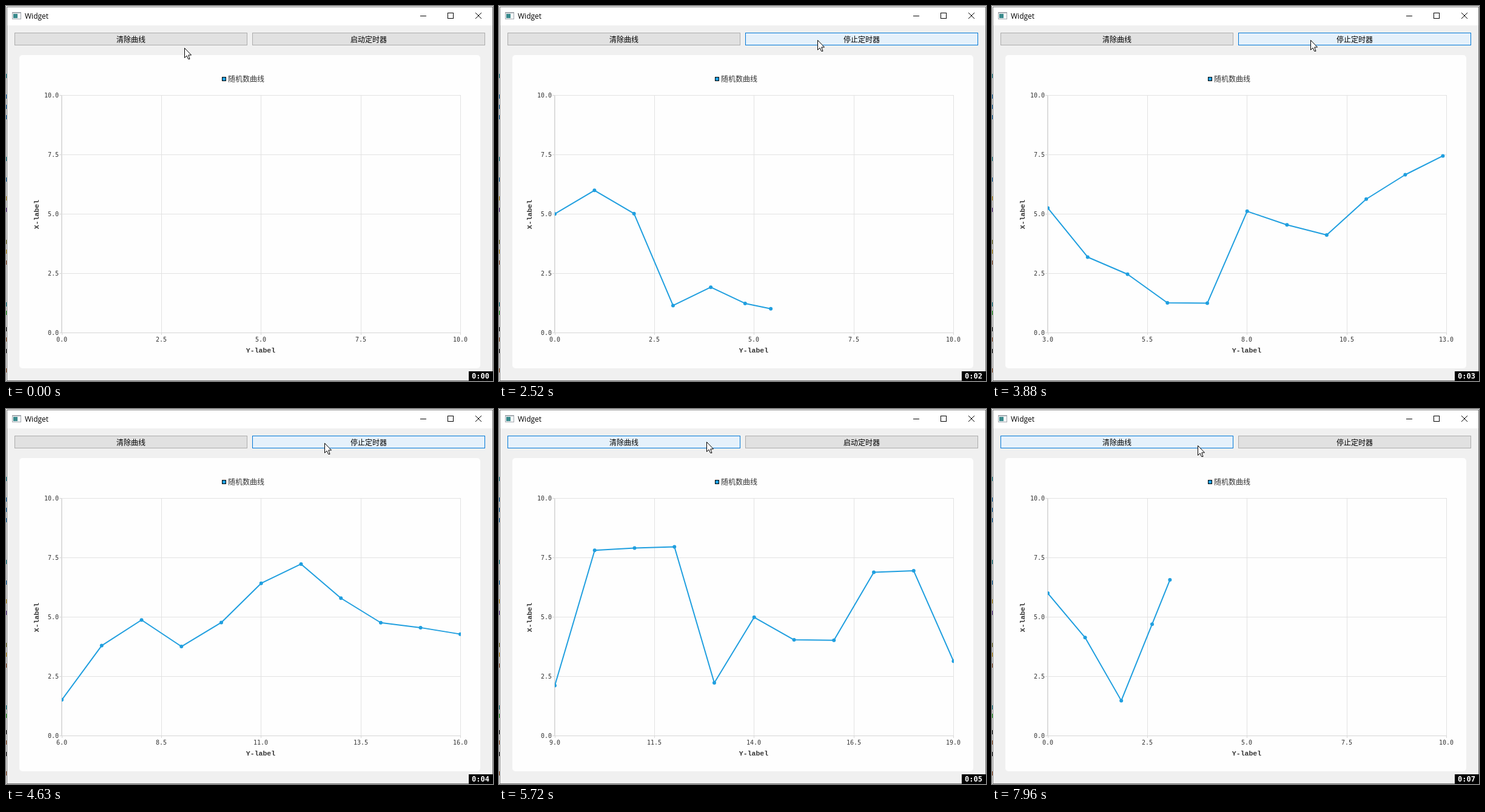
An HTML page with a canvas that plays this animation: 803x619 px, repeating every 8000 ms.

```html
<!DOCTYPE html>
<html lang="zh">
<head>
<meta charset="utf-8">
<title>Widget</title>
<style>
html, body { margin: 0; width: 100%; height: 100%; overflow: hidden; background: #fff; }
canvas { display: block; }
</style>
</head>
<body>
<canvas id="stage" width="803" height="619"></canvas>
<script>
const ctx = document.getElementById('stage').getContext('2d');
const LOOP = 8000;
const BLUE = '#209fdf';
const PLOT = { left: 92, top: 147.5, width: 657.5, height: 391.5 };
const CJK = '12px "Noto Sans CJK SC", "Noto Sans CJK", sans-serif';
const AXIS = '10px "DejaVu Sans Mono", monospace';
const AXIS_TITLE = 'bold 11.5px "Liberation Mono", monospace';

// Each run appends one value per timer tick until it is cleared.
const runs = [
  { start: 1135, end: 6000, period: 210,
    data: [5, 6, 5, 1, 2, 1, 1, 9, 4, 2, 8, 8, 8, 2, 5, 4, 4, 7, 7, 3] },
  { start: 7145, end: LOOP, period: 200, data: [6, 4, 1, 7, 0] }
];

// Pointer path: time, x, y
const path = [
  [60, 294, 69], [300, 320, 62], [500, 360, 58], [700, 390, 58], [850, 414, 58],
  [1450, 414, 58], [1600, 392, 58], [1800, 392, 57], [2150, 525, 56], [5300, 525, 56],
  [5620, 342, 54], [6300, 342, 54], [6700, 470, 43], [6800, 470, 48], [7100, 470, 48],
  [7500, 339, 60]
];

const buttons = [
  { x: 14, hover: [[192, 757], [1548, 1846], [5502, 6483], [7313, 9000]], press: [[5940, 6000]],
    label: () => '清除曲线' },
  { x: 406, hover: [[792, 1511], [1866, 5492], [6500, 7297]],
    press: [[980, 1060], [5140, 5200], [6880, 6945]],
    label: t => (t >= 1060 && t < 5200) || t >= 6945 ? '停止定时器' : '启动定时器' }
];

const clamp = v => Math.max(0, Math.min(1, v));
const lerp = (a, b, u) => a + (b - a) * u;
const mix = (a, b, u) => `rgb(${a.map((v, i) => Math.round(lerp(v, b[i], u)))})`;

function box(x, y, w, h, color) {
  ctx.fillStyle = color;
  ctx.fillRect(x, y, w, h);
}

function frame(x, y, w, h, color) {
  ctx.strokeStyle = color;
  ctx.lineWidth = 1;
  ctx.strokeRect(x + 0.5, y + 0.5, w - 1, h - 1);
}

function polyline(points, color, width = 1) {
  ctx.strokeStyle = color;
  ctx.lineWidth = width;
  ctx.beginPath();
  points.forEach(([x, y]) => ctx.lineTo(x, y));
  ctx.stroke();
}

function text(str, x, y, font, color = '#333', align = 'center') {
  ctx.font = font;
  ctx.fillStyle = color;
  ctx.textAlign = align;
  ctx.fillText(str, x, y);
}

function drawWindow() {
  box(0, 0, 803, 619, '#fff');
  const specks = { '#1a8f9c': [112, 249, 489], '#1673b8': [146, 163, 180, 283], '#d6a31c': [314, 402],
    '#6a3a9c': [333], '#8a8430': [386], '#a05a32': [420, 547, 598], '#24b324': [503], '#222': [530, 566] };
  for (const color in specks) specks[color].forEach(y => box(0, y, 2, 7, color));
  box(2, 2, 800, 30, '#fff');
  box(2, 32, 800, 586, '#f0f0f0');
  frame(1, 1, 802, 618, '#727272');

  box(10, 10, 15, 12, '#a5aab0');
  box(11, 12, 13, 9, '#f4f6f7');
  box(12, 13, 7, 7, '#3a8a8c');
  text('Widget', 31, 21, '12px "Open Sans", sans-serif', '#000', 'left');

  box(683, 16, 10, 1, '#000');
  frame(728, 11, 10, 10, '#000');
  polyline([[774, 11], [784, 21]], '#000');
  polyline([[784, 11], [774, 21]], '#000');
}

function hoverLevel(spans, t) {
  return Math.max(...spans.map(([from, to]) =>
    Math.min(clamp((t - from) / 200), clamp(1 - (t - to) / 200))));
}

function drawButton({ x, hover, press, label }, t) {
  const level = hoverLevel(hover, t);
  const pressed = press.some(([from, to]) => t >= from && t < to);
  box(x, 44, 384, 21, pressed ? '#cce4f7' : mix([225, 225, 225], [229, 241, 251], level));
  frame(x, 44, 384, 21, pressed ? '#005499' : mix([173, 173, 173], [0, 120, 215], level));
  text(label(t), x + 192, 59.5, CJK, '#000');
}

function drawAxes(first) {
  ctx.fillStyle = '#fefefe';
  ctx.beginPath();
  ctx.roundRect(22, 81, 760, 517, 5);
  ctx.fill();
  box(356, 117, 7, 7, BLUE);
  frame(356, 117, 7, 7, '#000');
  text('随机数曲线', 366, 124.5, CJK, '#333', 'left');

  const right = PLOT.left + PLOT.width, bottom = PLOT.top + PLOT.height;
  for (let i = 0; i <= 4; i++) {
    const x = Math.floor(PLOT.left + PLOT.width * i / 4);
    const y = Math.floor(bottom - PLOT.height * i / 4);
    box(x, 147, 1, 392, '#e2e2e2');
    box(92, y, 658, 1, '#e2e2e2');
    box(x, 539, 1, 4, '#d6d6d6');
    box(88, y, 4, 1, '#d6d6d6');
    text((i * 2.5).toFixed(1), 87, y + 4, AXIS, '#333', 'right');
    text((first + i * 2.5).toFixed(1), x, 554, AXIS);
  }
  box(91, 147, 1, 393, '#d6d6d6');
  box(91, 539, Math.ceil(right) - 91, 1, '#d6d6d6');

  text('Y-label', 420, 572, AXIS_TITLE);
  ctx.save();
  ctx.translate(54, 344);
  ctx.rotate(-Math.PI / 2);
  text('X-label', 0, 0, AXIS_TITLE);
  ctx.restore();
}

// Every tick restarts a one-second quartic ease-out from the points shown so far.
function chartState(t) {
  const run = runs.find(r => t >= r.start && t < r.end);
  let points = [], first = 0;
  if (!run) return { points, first };
  for (let k = 0; k < run.data.length; k++) {
    const tick = run.start + k * run.period;
    if (tick > t) break;
    first = Math.max(0, k - 10);
    const targets = run.data.slice(first, k + 1).map((y, x) => [x, y]);
    if (points.length < targets.length) points.push(targets[Math.max(0, targets.length - 2)]);
    const until = k + 1 < run.data.length ? Math.min(t, tick + run.period) : t;
    const delay = first > 0 ? 45 : 0;
    const rest = (1 - clamp((until - tick - delay) / 1000)) ** 4;
    points = targets.map((p, i) => p.map((v, j) => lerp(v, points[i][j], rest)));
  }
  return { points, first };
}

function drawCurve(points) {
  const pixels = points.map(([x, y]) =>
    [PLOT.left + x * PLOT.width / 10, PLOT.top + PLOT.height * (1 - y / 10)]);
  ctx.save();
  ctx.beginPath();
  ctx.rect(PLOT.left, 147, 658, 393);
  ctx.clip();
  ctx.lineJoin = 'round';
  polyline(pixels, BLUE, 2);
  ctx.fillStyle = BLUE;
  for (const [x, y] of pixels) {
    ctx.beginPath();
    ctx.arc(x, y, 3, 0, 2 * Math.PI);
    ctx.fill();
  }
  ctx.restore();
}

function pointerAt(t) {
  const next = path.findIndex(p => p[0] > t);
  if (next === 0) return path[0].slice(1);
  if (next < 0) return path[path.length - 1].slice(1);
  const [t0, x0, y0] = path[next - 1], [t1, x1, y1] = path[next];
  const u = (t - t0) / (t1 - t0), eased = u * u * (3 - 2 * u);
  return [lerp(x0, x1, eased), lerp(y0, y1, eased)].map(Math.round);
}

function drawPointer([x, y]) {
  ctx.save();
  ctx.translate(x + 0.5, y + 0.5);
  ctx.lineJoin = 'miter';
  ctx.lineWidth = 1;
  ctx.fillStyle = '#fff';
  ctx.strokeStyle = '#000';
  ctx.fill(ctxPointer);
  ctx.stroke(ctxPointer);
  ctx.restore();
}
const ctxPointer = new Path2D('M0 0V16L3.5 12.5L6 18H8.5L6.3 11.5H11Z');

function draw(t) {
  const { points, first } = chartState(t);
  drawWindow();
  buttons.forEach(b => drawButton(b, t));
  drawAxes(first);
  drawCurve(points);
  drawPointer(pointerAt(t));
  box(763, 603, 40, 16, '#000');
  text('0:0' + Math.floor(t / 1000), 782.5, 614.5, 'bold 12px "DejaVu Sans Mono", monospace', '#fff');
}

const began = performance.now();
function loop() {
  draw((performance.now() - began) % LOOP);
  requestAnimationFrame(loop);
}
loop();
</script>
</body>
</html>
```
